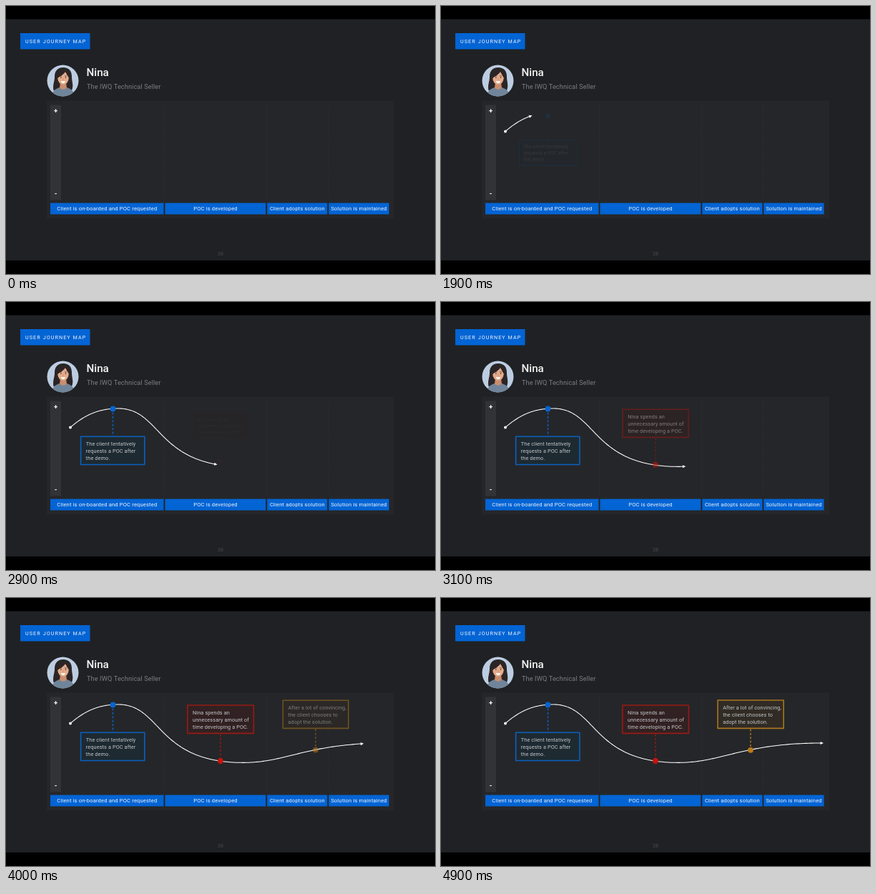
Animation of 600x375 px, one loop 5 s. Source, as an HTML page with a canvas:

```html
<!DOCTYPE html>
<html lang="en">
<head>
<meta charset="utf-8">
<title>User journey map</title>
<style>
  html, body { margin: 0; width: 100%; height: 100%; overflow: hidden; background: #000; }
  canvas { display: block; width: 600px; height: 375px; }
</style>
</head>
<body>
<canvas id="stage"></canvas>
<script>
const canvas = document.getElementById('stage');
const ctx = canvas.getContext('2d');
const dpr = window.devicePixelRatio || 1;
canvas.width = 600 * dpr;
canvas.height = 375 * dpr;

const LOOP = 5000, STEP = 100;
const DRAW_START = 1160, DRAW_TIME = 3500, POP_TIME = 400;
const FONT = 'Roboto, "Open Sans", sans-serif';
const BLUE = '#0364d4';

const stages = [
  [62, 220.5, 'Client is on-boarded and POC requested'],
  [222.5, 363.3, 'POC is developed'],
  [365.3, 449.4, 'Client adopts solution'],
  [451.4, 535.6, 'Solution is maintained']
];

const notes = [
  { start: 1850, x: 104.6, y: 188.3, w: 89.3, h: 39.2, dot: [149.5, 149.5],
    color: '#0764cf', edge: '#0a60bf', fill: '#1e2a31',
    lines: ['The client tentatively', 'requests a POC after', 'the demo.'] },
  { start: 2880, x: 253.8, y: 150, w: 92.6, h: 39.4, dot: [300, 228],
    color: '#c4150d', edge: '#971a15', fill: '#322122',
    lines: ['Nina spends an', 'unnecessary amount of', 'time developing a POC.'] },
  { start: 3780, x: 387, y: 143, w: 92.2, h: 39.4, dot: [433, 212.8],
    color: '#b97a1c', edge: '#a8751f', fill: '#302b24',
    lines: ['After a lot of convincing,', 'the client chooses to', 'adopt the solution.'] }
];

const clamp = v => Math.max(0, Math.min(1, v));

function bezier(a, b, c, d, t) {
  const s = 1 - t;
  return s * s * s * a + 3 * s * s * t * b + 3 * s * t * t * c + t * t * t * d;
}

// Ease in and out along cubic-bezier(.42, 0, .58, 1)
function ease(u) {
  let lo = 0, hi = 1;
  for (let i = 0; i < 24; i++) {
    const mid = (lo + hi) / 2;
    if (bezier(0, 0.42, 0.58, 1, mid) < u) lo = mid; else hi = mid;
  }
  return bezier(0, 0, 1, 1, hi);
}

// Journey curve as a polyline with running length
const route = [{ x: 90, y: 175.5, len: 0 }];
[
  [90, 175.5, 110, 158, 130, 149, 157, 149],
  [157, 149, 217, 149, 210, 227.5, 326, 230.3],
  [326, 230.3, 392, 232, 419, 202.5, 535, 203]
].forEach(([ax, ay, bx, by, cx, cy, dx, dy]) => {
  for (let i = 1; i <= 80; i++) {
    const p = route[route.length - 1];
    const x = bezier(ax, bx, cx, dx, i / 80), y = bezier(ay, by, cy, dy, i / 80);
    route.push({ x, y, len: p.len + Math.hypot(x - p.x, y - p.y) });
  }
});
const total = route[route.length - 1].len;

function pointAt(len) {
  const i = Math.max(1, route.findIndex(p => p.len >= len));
  const a = route[i - 1], b = route[i];
  const k = (len - a.len) / (b.len - a.len);
  return { x: a.x + (b.x - a.x) * k, y: a.y + (b.y - a.y) * k };
}

function rect(x, y, w, h, color) {
  ctx.fillStyle = color;
  ctx.fillRect(x, y, w, h);
}

function disc(x, y, rx, color, ry = rx) {
  ctx.fillStyle = color;
  ctx.beginPath();
  ctx.ellipse(x, y, rx, ry, 0, 0, Math.PI * 2);
  ctx.fill();
}

function shape(d, color) {
  ctx.fillStyle = color;
  ctx.fill(new Path2D(d));
}

function line(d, color, width) {
  ctx.strokeStyle = color;
  ctx.lineWidth = width;
  ctx.stroke(new Path2D(d));
}

function text(str, x, y, size, color, { weight = 400, gap = 0, align = 'left' } = {}) {
  ctx.font = `${weight} ${size}px ${FONT}`;
  ctx.letterSpacing = gap + 'px';
  ctx.textAlign = align;
  ctx.fillStyle = color;
  ctx.fillText(str, x, y);
}

function drawAvatar() {
  ctx.save();
  ctx.beginPath();
  ctx.arc(79.5, 104.5, 22, 0, Math.PI * 2);
  ctx.clip();
  rect(57, 82, 45, 45, '#bccde2');
  shape('M66.5 118 C65 110 68 106 68 99 C68 90 73 86 80 86 C88 86 92 91 92 99 C92 106 95 111 92 118 Z', '#2b2526');
  shape('M64 128 C64 119 69 116 75 114 L85 114 C91 116 96 119 96 128 Z', '#70859a');
  shape('M76 107 L84 107 L85 114.5 Q80 119 75 114.5 Z', '#c98d70');
  disc(80, 100.5, 7.8, '#e3ab8b', 9.6);
  shape('M71 102 C70 91 75 88 81 88 C87 88 90 93 89 102 C87 99 85 96 83 92 C80 97 75 98 71 102 Z', '#2b2526');
  disc(76.8, 100, 0.8, '#2b2526');
  disc(83.4, 100, 0.8, '#2b2526');
  line('M75.2 98.2 Q76.8 97.2 78.2 98 M82 98 Q83.6 97.2 85 98.2', '#2b2526', 0.6);
  line('M80 101 L79.4 103.2 L80.6 103.2', '#c0866a', 0.6);
  shape('M76.8 104.7 Q80 105.8 83.2 104.7 Q82.4 108 80 108 Q77.6 108 76.8 104.7 Z', '#fff');
  ctx.restore();
}

function drawBoard() {
  rect(0, 0, 600, 375, '#000');
  rect(0, 18.5, 600, 337.5, '#202124');
  rect(20, 38, 97.5, 22.5, BLUE);
  text('USER JOURNEY MAP', 27, 51.9, 7.2, '#f2f6fc', { gap: 1.08 });
  drawAvatar();
  text('Nina', 112.5, 98.3, 15.2, '#f4f4f4', { weight: 500 });
  text('The IWQ Technical Seller', 113, 116.2, 9.2, '#7d7e81', { gap: 0.1 });

  rect(57, 132.3, 486, 165, '#252629');
  rect(62, 138.5, 15, 133, '#323336');
  text('+', 69.5, 149.6, 9.5, '#fff', { weight: 700, align: 'center' });
  text('-', 69.5, 264.9, 9.5, '#fff', { weight: 700, align: 'center' });

  ctx.setLineDash([1.5, 1.5]);
  for (const x of [221.5, 364.5, 450.5]) line(`M${x} 138.5 V271`, '#303134', 0.8);
  ctx.setLineDash([]);

  for (const [left, right, label] of stages) {
    rect(left, 275.6, right - left, 15.9, BLUE);
    text(label, (left + right) / 2 + 0.1, 286.3, 7.6, '#eef4fc', { gap: 0.15, align: 'center' });
  }
  text('28', 300, 349, 7.2, '#48494c', { align: 'center' });
}

function drawRoute(t) {
  const u = clamp((t - DRAW_START) / DRAW_TIME);
  if (!u) return;
  const len = total * ease(u);
  const tip = pointAt(len), base = pointAt(Math.max(0, len - 4));

  ctx.beginPath();
  ctx.moveTo(route[0].x, route[0].y);
  for (const p of route) if (p.len < len - 4) ctx.lineTo(p.x, p.y);
  ctx.lineTo(base.x, base.y);
  ctx.strokeStyle = '#fff';
  ctx.lineWidth = 1.05;
  ctx.lineJoin = 'round';
  ctx.stroke();
  disc(route[0].x, route[0].y, 1.9, '#fff');

  if (len < 2) return;
  ctx.save();
  ctx.translate(tip.x, tip.y);
  ctx.rotate(Math.atan2(tip.y - base.y, tip.x - base.x));
  shape('M0 0 L-4.4 -2.1 V2.1 Z', '#fff');
  ctx.restore();
}

function drawNote(n, t) {
  const p = clamp((t - n.start) / POP_TIME);
  if (!p) return;
  const [dx, dy] = n.dot;
  const below = n.y > dy;
  const top = below ? dy - 4 : n.y, bottom = below ? n.y + n.h : dy + 4;
  const cx = n.x + n.w / 2, cy = (top + bottom) / 2;
  const scale = 1 - 0.18 * Math.pow(1 - p, 4);

  ctx.save();
  ctx.globalAlpha = p;
  ctx.translate(cx, cy);
  ctx.scale(scale, scale);
  ctx.translate(-cx, -cy);

  ctx.setLineDash([3, 2.4]);
  line(below ? `M${dx} ${dy + 5} V${n.y}` : `M${dx} ${n.y + n.h + 1} V${dy - 3}`, n.edge, 1.5);
  ctx.setLineDash([]);
  disc(dx, dy, 3.9, n.color);

  rect(n.x, n.y, n.w, n.h, n.fill);
  ctx.strokeStyle = n.edge;
  ctx.lineWidth = 1.6;
  ctx.strokeRect(n.x, n.y, n.w, n.h);
  n.lines.forEach((str, i) =>
    text(str, n.x + 7.2, n.y + 12.7 + i * 10, 7.3, '#c3c7ca', { gap: 0.12 }));
  ctx.restore();
}

function render(now) {
  const t = Math.floor((now % LOOP) / STEP) * STEP;
  ctx.setTransform(dpr, 0, 0, dpr, 0, 0);
  drawBoard();
  drawRoute(t);
  for (const n of notes) drawNote(n, t);
}

let begin = null;
function tick(now) {
  if (begin === null) begin = now;
  render(Math.max(0, now - begin));
  requestAnimationFrame(tick);
}
render(0);
requestAnimationFrame(tick);
</script>
</body>
</html>
```
